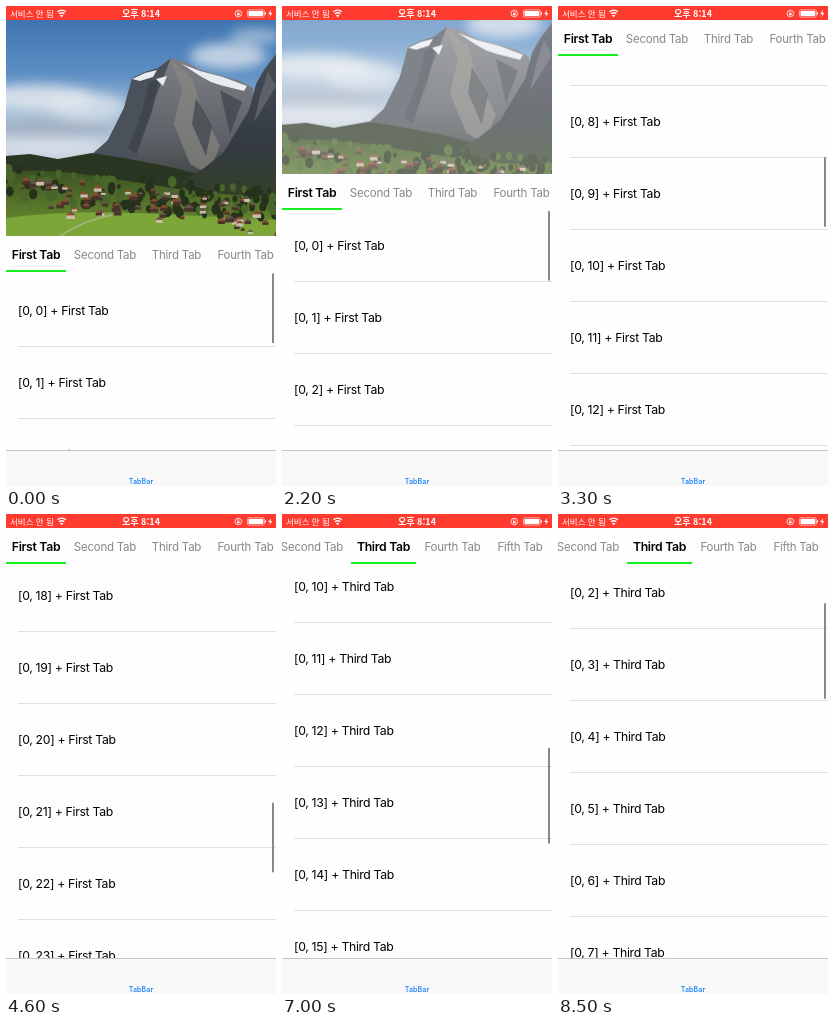
An HTML page that plays this animation: 270 by 480 pixels, repeating every 8.6 s.

```html
<!DOCTYPE html>
<html lang="ko">
<head>
<meta charset="utf-8">
<title>Tabs with collapsing header</title>
<style>
html, body { margin: 0; width: 100%; height: 100%; overflow: hidden; background: #fefdff; }
#stage { position: relative; width: 270px; height: 480px; overflow: hidden; background: #fefdff;
  font-family: Inter, "Open Sans", sans-serif; color: #000; }
#stage div { position: absolute; white-space: nowrap; }
#view { left: 0; top: 0; width: 270px; height: 444px; overflow: hidden; }
#pages, .page, .rows { left: 0; top: 0; width: 270px; }
.row { left: 12px; width: 258px; height: 72px; line-height: 73.4px; font-size: 12.24px; letter-spacing: -.31px; }
.row::after { content: ""; position: absolute; left: 0; right: 0; top: 72px; height: 1px; background: #dfdfe2; }
.bar { left: 266px; top: 0; width: 1.8px; border-radius: 1px; background: #888; }
#head { left: 0; top: 14px; width: 270px; overflow: hidden; background: #fff; }
#head svg { position: absolute; left: 0; top: 0; }
#tabs { left: 0; top: 0; width: 270px; height: 36px; background: #fefdff; overflow: hidden; }
#strip { left: 0; top: 0; height: 36px; }
.tab { top: 0; line-height: 38px; text-align: center; font-size: 11.5px; letter-spacing: -.24px; color: #888; }
.tab span { position: absolute; left: 50%; transform: translateX(-50%); }
.tab.on { font-size: 12.24px; font-weight: 600; letter-spacing: -.3px; color: #000; }
#mark { top: 34px; height: 2px; background: #14f01e; }
#status { left: 0; top: 0; width: 270px; height: 14px; background: #ff3b30; color: #fff;
  font-family: "Noto Sans CJK KR", "Noto Sans CJK", "Noto Sans CJK JP", sans-serif; line-height: 15.4px; }
#status svg { position: absolute; left: 0; top: 0; }
#foot { left: 0; top: 444px; width: 270px; height: 36px; background: #f8f8f8; box-shadow: inset 0 1px #c4c4c6; }
#foot div { left: 0; width: 270px; top: 26px; line-height: 11.6px; text-align: center;
  font-size: 7.1px; font-weight: 500; color: #0a7aff; letter-spacing: .1px; }
</style>
</head>
<body>
<div id="stage">
  <div id="view"><div id="pages"></div></div>
  <div id="head">
    <svg id="photo" width="270" height="216" viewBox="0 14 270 216">
      <defs>
        <linearGradient id="sky" x1="0" y1="0" x2="0" y2="1">
          <stop offset="0" stop-color="#3f74b0"/><stop offset=".25" stop-color="#5d8fc4"/>
          <stop offset=".45" stop-color="#a5bfd8"/><stop offset=".62" stop-color="#c3cedb"/>
        </linearGradient>
        <linearGradient id="rock" x1="0" y1="0" x2="0" y2="1">
          <stop offset="0" stop-color="#7d7f84"/><stop offset=".6" stop-color="#5c6066"/><stop offset="1" stop-color="#333c36"/>
        </linearGradient>
        <linearGradient id="cliff" x1="0" y1="0" x2="0" y2="1">
          <stop offset="0" stop-color="#474d57"/><stop offset=".65" stop-color="#343a41"/><stop offset="1" stop-color="#333f28"/>
        </linearGradient>
        <linearGradient id="grass" x1="0" y1="0" x2="0" y2="1">
          <stop offset="0" stop-color="#3b5222"/><stop offset="1" stop-color="#6f9433"/>
        </linearGradient>
        <filter id="soft" x="-30%" y="-60%" width="160%" height="220%"><feGaussianBlur stdDeviation="6"/></filter>
      </defs>
      <rect y="14" width="270" height="216" fill="url(#sky)"/>
      <g filter="url(#soft)" fill="#e4e9ef">
        <ellipse cx="222" cy="50" rx="38" ry="13" opacity=".75"/>
        <ellipse cx="250" cy="30" rx="26" ry="8" opacity=".5"/>
        <ellipse cx="30" cy="92" rx="60" ry="13" opacity=".85"/>
        <ellipse cx="80" cy="100" rx="40" ry="14" opacity=".7"/>
        <ellipse cx="40" cy="122" rx="70" ry="9" fill="#a2b1c4"/>
        <ellipse cx="40" cy="140" rx="60" ry="8" opacity=".7"/>
      </g>
      <path d="M80 160L86 148 102 134 118 102 126 72 139 66 152 62 165 52 180 56 194 64 216 70 234 75 247 82 250 190H80Z" fill="url(#rock)"/>
      <path d="M165 52L152 62 139 66 126 72 118 102 102 134 88 149 98 165 130 155 142 112 151 88Z" fill="#4b515b"/>
      <path d="M165 54L176 84 168 118 184 158 202 168 214 140 196 104 186 72Z" fill="#8b8983" opacity=".65"/>
      <path d="M143 76L153 72 146 106 130 148 122 142 136 106ZM190 92L206 120 200 150 186 118ZM214 84L236 96 224 128Z" fill="#3a3f48" opacity=".65"/>
      <path d="M126 73L139 67 151 64 147 71 134 75ZM176 58L194 65 217 71 241 80 238 85 214 79 205 76 194 70ZM150 73L161 70 157 80Z" fill="#e8ebef"/>
      <path d="M0 150L24 148 52 153 86 147 118 152 160 160 200 170 270 165V204H0Z" fill="#2a3622"/>
      <path d="M270 48L258 64 250 78 243 104 231 124 218 146 198 162 176 176 210 188 270 190Z" fill="url(#cliff)"/>
      <path d="M262 66L254 90 248 116 258 100 270 80Z" fill="#5b6069"/>
      <path d="M0 166Q40 162 90 170T180 184 270 190V230H0Z" fill="url(#grass)"/>
      <path d="M0 212Q60 204 130 207T270 214V230H0Z" fill="#7ca638"/>
      <g id="village"></g>
      <path d="M54 230Q78 214 106 209" fill="none" stroke="#a9b58a" stroke-width="1.4"/>
    </svg>
  </div>
  <div id="tabs"><div id="strip"></div></div>
  <div id="status">
    <div style="left:4px;font-size:8.5px">서비스 안 됨</div>
    <div style="left:0;width:270px;text-align:center;font-size:9px;font-weight:700">오후 8:14</div>
    <svg width="270" height="14" fill="none" stroke="#fff">
      <path d="M51.4 5.9a6 6 0 0 1 8.6 0M53 7.900a3.800 3.800 0 0 1 5.400 0" stroke-width="1.3"/>
      <path d="M55.7 11.300L54 9.500a2.400 2.400 0 0 1 3.400 0Z" fill="#fff" stroke="none"/>
      <circle cx="232.300" cy="7.500" r="3.300" stroke-width=".8"/>
      <path d="M231 7.300h2.600v2h-2.600z" fill="#fff" stroke="none"/>
      <path d="M231.500 7.300V6.300a.8.8 0 0 1 1.600 0V7.300" stroke-width=".5"/>
      <rect x="241.400" y="3.900" width="17" height="7.200" rx="1.600" stroke-width=".6"/>
      <rect x="242.500" y="5" width="14.800" height="5" rx=".7" fill="#fff" stroke="none"/>
      <path d="M259.400 6.300v2.400" stroke-width="1"/>
      <path d="M265 4.100L262.200 8H264.100L263.400 11.100 266.400 6.900H264.500Z" fill="#fff" stroke="none"/>
    </svg>
  </div>
  <div id="foot"><div>TabBar</div></div>
</div>
<script>
const LOOP = 8600, STEP = 100, W = 270, TOP = 14, FOLD = 216, TAB = 36, ROW = 72, VIEW = 394;
const names = ["First", "Second", "Third", "Fourth", "Fifth"];
const widths = [60, 78, 65, 73, 62];
const lefts = widths.map((w, i) => widths.slice(0, i).reduce((a, b) => a + b, 0));
const counts = [30, 20, 22];
const stripShift = [0, 30, 69];

// [time in ms, value]
const swipe = [[4800, 0], [5000, .1], [5200, .46], [5400, .86], [5600, .99], [5700, 1.004],
  [5900, 1.004], [6050, 1.1], [6200, 1.5], [6350, 1.88], [6500, 1.99], [6600, 2]];
const scrolls = [
  [[0, -2], [300, 0], [1800, 0], [2200, 62.5], [2500, 150], [2700, 232], [3000, 480], [3300, 763],
    [3700, 1090], [4100, 1350], [4600, 1517]],
  [[0, 0]],
  [[6500, 0], [6700, 170], [7000, 734], [7200, 980], [7400, 1060],
    [7500, 1060], [7700, 1010], [8000, 680], [8300, 270], [8500, 152]]
];
const barFade = [[0, 1], [300, 1], [700, 0], [1800, 0], [1900, 1]];

// Monotone cubic through the points, held at both ends
function track(keys, t) {
  const n = keys.length - 1;
  if (t <= keys[0][0]) return keys[0][1];
  if (t >= keys[n][0]) return keys[n][1];
  const i = keys.findIndex(k => k[0] > t) - 1;
  const slope = j => j < 0 || j >= n ? 0 : (keys[j + 1][1] - keys[j][1]) / (keys[j + 1][0] - keys[j][0]);
  const tangent = j => {
    const a = slope(j - 1), b = slope(j);
    return a * b > 0 ? 2 * a * b / (a + b) : 0;
  };
  const h = keys[i + 1][0] - keys[i][0], u = (t - keys[i][0]) / h, v = 1 - u;
  return keys[i][1] * (1 + 2 * u) * v * v + keys[i + 1][1] * u * u * (3 - 2 * u)
    + h * u * v * (tangent(i) * v - tangent(i + 1) * u);
}

const mix = (list, p) => {
  const i = Math.min(Math.floor(p), list.length - 2);
  return list[i] + (list[i + 1] - list[i]) * (p - i);
};
const $ = id => document.getElementById(id);
const add = (parent, cls, text = "") => {
  const el = document.createElement("div");
  el.className = cls;
  el.textContent = text;
  return parent.appendChild(el);
};

const pages = counts.map((count, i) => {
  const page = add($("pages"), "page");
  page.style.left = i * W + "px";
  const rows = add(page, "rows");
  for (let r = 0; r < count; r++)
    add(rows, "row", `[0, ${r}] + ${names[i]} Tab`).style.top = r * ROW + "px";
  const bar = add(page, "bar"), ratio = VIEW / (count * ROW);
  bar.style.height = VIEW * ratio - 2 + "px";
  return { rows, bar, ratio };
});

const tabs = names.map((name, i) => {
  const tab = add($("strip"), "tab");
  tab.style.left = lefts[i] + "px";
  tab.style.width = widths[i] + "px";
  tab.appendChild(document.createElement("span")).textContent = name + " Tab";
  return tab;
});
const mark = add($("strip"), "");
mark.id = "mark";

function buildVillage() {
  let seed = 11, out = "";
  const rnd = () => (seed = seed * 16807 % 2147483647) / 2147483647;
  const ground = x => 160 + x * .09;
  for (let i = 0; i < 170; i++) {
    const x = rnd() * W, y = ground(x) + rnd() * 32, h = 3 + rnd() * 6;
    out += `<ellipse cx="${x}" cy="${y}" rx="${h * .5}" ry="${h * .65}" fill="${rnd() < .65 ? "#26321b" : "#48652a"}"/>`;
  }
  for (let i = 0; i < 75; i++) {
    const x = rnd() * W, y = ground(x) + 10 + rnd() * 34, w = 4 + rnd() * 5, h = w * .45;
    out += `<path d="M${x} ${y}h${w}v${h}h${-w}z" fill="${rnd() < .3 ? "#c9bcaa" : "#49342a"}"/>`
      + `<path d="M${x - 1} ${y}l${w / 2 + 1} ${-h}l${w / 2 + 1} ${h}z" fill="${rnd() < .5 ? "#8a4a34" : "#66534a"}"/>`;
  }
  $("village").innerHTML = out;
}

function draw(t) {
  const p = track(swipe, t), first = track(scrolls[0], t);
  const fold = Math.max(0, Math.min(FOLD, first));
  const edge = TOP + Math.ceil(FOLD - fold), listTop = TOP + FOLD + TAB - fold;
  $("head").style.height = edge - TOP + "px";
  $("photo").style.transform = `translateY(${-fold / 2}px)`;
  $("photo").style.opacity = 1 - fold / FOLD;
  $("tabs").style.transform = `translateY(${edge}px)`;
  $("pages").style.transform = `translateX(${-Math.round(p * W)}px)`;
  pages.forEach(({ rows, bar, ratio }, i) => {
    const y = i ? track(scrolls[i], t) : first - fold;
    rows.style.transform = `translateY(${Math.floor(listTop - y)}px)`;
    bar.style.transform = `translateY(${listTop + 1.3 + Math.max(0, y) * ratio}px)`;
  });
  pages[0].bar.style.opacity = track(barFade, t);
  const q = Math.min(2, p), on = Math.round(q);
  $("strip").style.transform = `translateX(${-mix(stripShift, q)}px)`;
  mark.style.left = mix(lefts, q) + "px";
  mark.style.width = mix(widths, q) + "px";
  tabs.forEach((tab, i) => tab.classList.toggle("on", i === on));
}

buildVillage();
const start = performance.now();
function tick() {
  const t = (performance.now() - start) % LOOP;
  draw(Math.floor(t / STEP) * STEP);
  requestAnimationFrame(tick);
}
tick();
</script>
</body>
</html>
```
